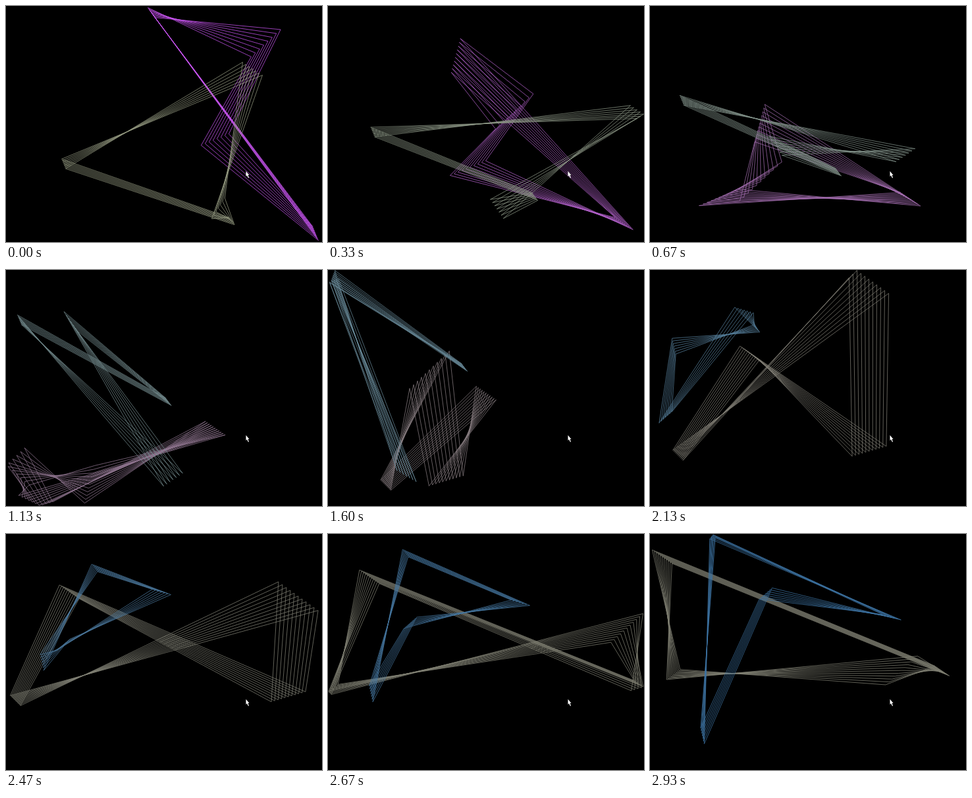
Write an HTML page with a canvas that moves like this. It is 480 px wide and 360 px high and loops after 3000 ms.

```html
<!DOCTYPE html>
<html>
<head>
<meta charset="utf-8">
<style>
html, body { margin: 0; width: 100%; height: 100%; overflow: hidden; background: #000; }
canvas { display: block; }
</style>
</head>
<body>
<canvas id="stage" width="480" height="360"></canvas>
<script>
const ctx = document.getElementById('stage').getContext('2d');
const LOOP = 3000, STEPS = 45, RIGHT = 479, BOTTOM = 359;

// Each corner moves freely on x and y: a start, then the speed per step,
// which takes a new value at every wall.
const corner = (x, xSpeeds, y, ySpeeds) => s => [
  bounce(x, xSpeeds, RIGHT, s),
  bounce(y, ySpeeds, BOTTOM, s)
];

function bounce(pos, speeds, size, s) {
  for (const v of speeds) {
    const wall = v > 0 ? size : 0;
    const hit = (wall - pos) / v;
    if (s <= hit) return pos + v * s;
    s -= hit;
    pos = wall;
  }
  return pos;
}

const violet = {
  gap: 0.27,
  count: s => Math.min(11, Math.floor(8 + s * 0.4)),
  from: [200, 85, 240],
  to: [128, 128, 115],
  ease: k => 1 - (1 - k) ** 3,
  corners: [
    corner(215, [-5.65, 7.6], 2, [-8, 21.2, -5.7]),
    corner(372, [-23.6, 22.3, -18], 77, [22, -21.1, 16.2]),
    corner(296, [-22.2, 19.2, -8.2], 212, [9.2, -5.65]),
    corner(474, [4.5, -11.1], 357, [11, -7.65])
  ]
};
const green = {
  gap: 0.25,
  count: () => 7,
  from: [150, 155, 130],
  to: [60, 115, 165],
  ease: k => k,
  corners: [
    corner(84, [-3.95, 3.6], 233, [-9.7, 16]),
    corner(389, [20, -19.2, 12.7], 105, [13.2, -11.2]),
    corner(312, [-13.2, 18.7], 324, [21, -19.3, 5.5]),
    corner(338, [-5.63], 322, [-7.47, 7.5])
  ]
};

function drawShape({ gap, count, from, to, ease, corners }, s) {
  const k = ease(s / STEPS);
  const rgb = from.map((c, i) => Math.round(c + (to[i] - c) * k));
  ctx.strokeStyle = `rgba(${rgb}, 0.75)`;
  for (let i = count(s) - 1; i >= 0; i--) {
    ctx.beginPath();
    for (const at of corners) {
      const [x, y] = at(s - i * gap);
      ctx.lineTo(x + 0.5, y + 0.5);
    }
    ctx.closePath();
    ctx.stroke();
  }
}

function draw(now) {
  const t = Math.floor(now % LOOP / 10) * 10 + 5;
  const step = Math.floor(t * STEPS / LOOP);
  ctx.fillStyle = '#000';
  ctx.fillRect(0, 0, 480, 360);
  drawShape(violet, step);
  drawShape(green, step);
  ctx.fillStyle = '#fff';
  ctx.fill(new Path2D('M364.5 252v8l1.5-1.5 2 4 1-.5-1.5-4h2z'));
  requestAnimationFrame(draw);
}
draw(0);
</script>
</body>
</html>
```
